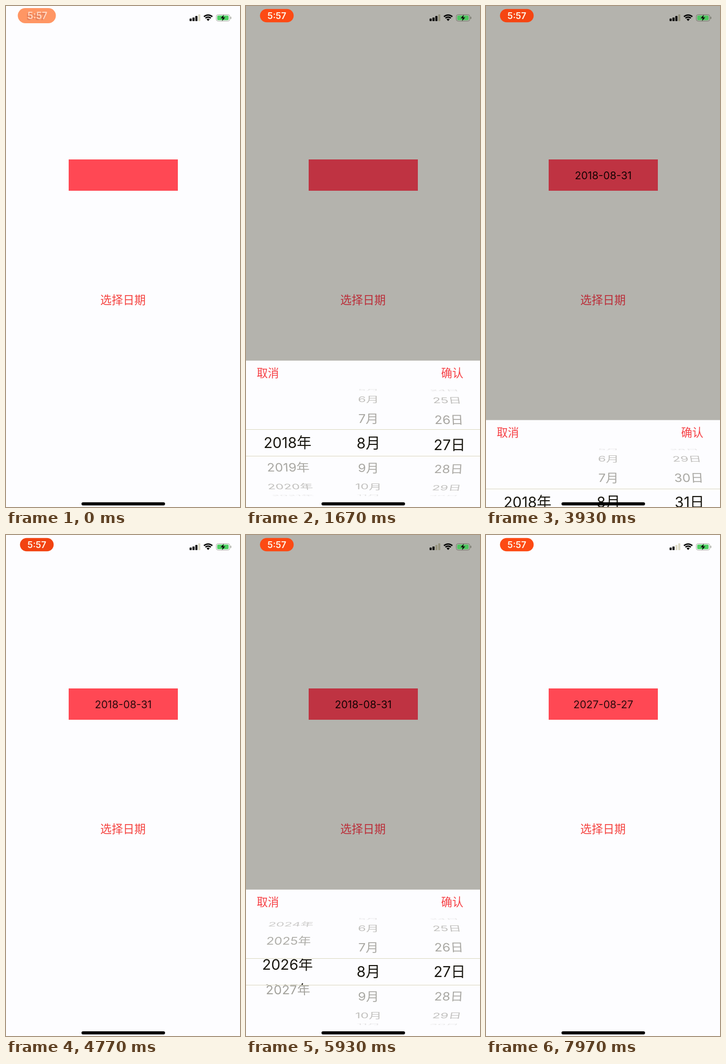
Recreate the animation shown at these times as an HTML page with a canvas. Size 448x960 px, loop 8 s.

```html
<!DOCTYPE html>
<html lang="zh-CN">
<head>
<meta charset="utf-8">
<title>选择日期</title>
<style>
html, body { margin: 0; width: 100%; height: 100%; overflow: hidden; background: #fdfdff; }
canvas { display: block; width: 448px; height: 960px; }
</style>
</head>
<body>
<canvas id="stage"></canvas>
<script>
const W = 448, H = 960, LOOP = 8000;
const FONT = 'Inter, "Noto Sans CJK SC", "Noto Sans CJK", "Noto Sans CJK JP", sans-serif';
const CJK = '"Noto Sans CJK SC", "Noto Sans CJK", "Noto Sans CJK JP", sans-serif';
const canvas = document.getElementById('stage');
const ctx = canvas.getContext('2d');
const dpr = window.devicePixelRatio || 1;
canvas.width = W * dpr;
canvas.height = H * dpr;

const SHEET_TOP = 679.5, SHEET_H = 281;
const MID = 837, BAND_TOP = 811.5, BAND_BOTTOM = 862.5;
const RADIUS = 102, STEP = 27.5 * Math.PI / 180, AXIS = 234.5;

const progress = (t, from, to) => Math.min(1, Math.max(0, (t - from) / (to - from)));
const smooth = u => u * u * (3 - 2 * u);
const easeOut = u => 1 - (1 - u) ** 3;
const mix = (a, b, u) => a + (b - a) * u;
const mixRgb = (a, b, u) => `rgb(${a.map((v, i) => Math.round(mix(v, b[i], u)))})`;

// Each session: slide in, spin the wheels to today, slide out.
const sessions = [
  { open: 1000, close: 3800, spin: 1070 },
  { open: 4900, close: 7038, spin: 4970 }
];
const SLIDE = 300, SPIN = 700;

function wheelsAt(t, index) {
  const s = sessions[index];
  const spin = easeOut(progress(t, s.spin, s.spin + SPIN));
  const wheels = { year: 2018, month: mix(1, 8, spin), day: mix(1, 27, spin) };
  if (index === 0) {
    wheels.day += 4.6 * easeOut(progress(t, 2200, 2800));
    wheels.day -= 0.6 * easeOut(progress(t, 2800, 3320));
  } else {
    wheels.year += 9 * easeOut(progress(t, 5500, 6255));
  }
  return wheels;
}

function text(str, x, y, size, color, family = FONT, weight = 400, align = 'center') {
  ctx.font = `${weight} ${size}px ${family}`;
  ctx.textAlign = align;
  ctx.fillStyle = color;
  ctx.fillText(str, x, y);
}

function roundRect(x, y, w, h, r) {
  ctx.beginPath();
  ctx.roundRect(x, y, w, h, r);
}

function clipped(y, h, draw) {
  ctx.save();
  ctx.beginPath();
  ctx.rect(0, y, W, h);
  ctx.clip();
  draw();
  ctx.restore();
}

function drawColumn(col, pos, scale, inBand) {
  const first = Math.max(col.min, Math.ceil(pos - 3.2));
  const last = Math.min(col.max, Math.floor(pos + 3.2));
  for (let n = first; n <= last; n++) {
    const angle = (n - pos) * STEP;
    const cos = Math.cos(angle), sin = Math.sin(angle);
    if (cos <= 0.02) continue;
    const lean = (AXIS - col.x) * 0.00075;
    const x = col.x + lean * RADIUS * (1 - cos);
    ctx.save();
    ctx.transform(scale, 0, lean * sin * scale, scale * cos, x, MID + RADIUS * sin);
    const color = inBand ? '#191710' : `rgba(78,75,62,${0.08 + 0.45 * cos})`;
    text(n + col.unit, 0, 10.2, 28, color);
    ctx.restore();
  }
}

const columns = [
  { key: 'year', unit: '年', x: 79.5, min: 2018, max: 2027 },
  { key: 'month', unit: '月', x: 234.5, min: 1, max: 12 },
  { key: 'day', unit: '日', x: 389.7, min: 1, max: 31 }
];

function drawSheet(offset, wheels) {
  ctx.save();
  ctx.translate(0, offset);
  ctx.fillStyle = '#fdfdff';
  ctx.fillRect(0, SHEET_TOP, W, SHEET_H);
  text('取消', 20.5, 711, 21.3, '#f64045', CJK, 400, 'left');
  text('确认', 416, 711, 21.3, '#f64045', CJK, 400, 'right');
  const rows = (scale, inBand) => () =>
    columns.forEach(c => drawColumn(c, wheels[c.key], scale, inBand));
  clipped(728, BAND_TOP - 728, rows(0.89, false));
  clipped(BAND_TOP, BAND_BOTTOM - BAND_TOP, rows(1, true));
  clipped(BAND_BOTTOM, 100, rows(0.89, false));
  ctx.fillStyle = '#dbd8c0';
  ctx.fillRect(0, 811, W, 1);
  ctx.fillRect(0, 862, W, 1);
  ctx.restore();
}

function drawClock(t) {
  const settle = smooth(progress(t, 30, 450));
  const dip = Math.max(0, 1 - Math.abs(t - 4500) / 1500);
  const grow = mix(1.13, 1, settle);
  const w = 64.5 * grow, h = 25.5 * grow;
  const rest = [mix(253, 240, dip), mix(74, 66, dip), mix(20, 16, dip)];
  ctx.fillStyle = mixRgb([255, 150, 100], rest, settle);
  roundRect(59 - w / 2, 18.5 - h / 2, w, h, h / 2);
  ctx.fill();
  if (settle < 1) {
    ctx.globalAlpha = 1 - settle;
    text('5:57', 57.5, 27, 17.5, '#e07c5c', FONT, 600);
    ctx.globalAlpha = 1;
  }
  text('5:57', mix(60, 59, settle), 24.7, 17 * mix(1.06, 1, settle),
    mixRgb([255, 215, 195], [255, 248, 235], settle), FONT, 600);
}

function drawStatusIcons(t, dim) {
  const strength = t < 5400 ? 3 : 2;
  [5, 7, 10, 13].forEach((h, i) => {
    ctx.fillStyle = i < strength ? '#000' : dim ? '#96937d' : '#dedbc6';
    roundRect(351.5 + i * 5.5, 29 - h, 4, h, 1);
    ctx.fill();
  });

  // Wi-Fi fan
  const cx = 387, cy = 28.5, a = Math.PI * 0.25;
  ctx.strokeStyle = ctx.fillStyle = '#000';
  ctx.lineWidth = 2.6;
  for (const r of [11.3, 7.2]) {
    ctx.beginPath();
    ctx.arc(cx, cy, r, -Math.PI / 2 - a, -Math.PI / 2 + a);
    ctx.stroke();
  }
  ctx.beginPath();
  ctx.moveTo(cx, cy + 0.3);
  ctx.arc(cx, cy, 4.2, -Math.PI / 2 - a, -Math.PI / 2 + a);
  ctx.fill();

  // Battery
  ctx.lineWidth = 1;
  ctx.strokeStyle = dim ? '#77766c' : '#a9a9a2';
  roundRect(402.5, 16.5, 26, 12.5, 3.8);
  ctx.stroke();
  ctx.fillStyle = ctx.strokeStyle;
  roundRect(429.7, 20.5, 1.6, 4.5, 0.8);
  ctx.fill();
  ctx.fillStyle = dim ? '#4ec55f' : '#4fcf63';
  roundRect(404.3, 18.3, 22, 9, 2.2);
  ctx.fill();
  ctx.beginPath();
  [[417, 16.8], [410.8, 23.6], [414.8, 23.6], [413.6, 28.9], [419.8, 21.8], [415.8, 21.8]]
    .forEach(([x, y]) => ctx.lineTo(x, y));
  ctx.closePath();
  ctx.fillStyle = '#0a0f08';
  ctx.fill();
}

function render(t) {
  ctx.setTransform(dpr, 0, 0, dpr, 0, 0);
  const index = sessions.findIndex(s => t >= s.open && t < s.close + SLIDE);
  const dim = index >= 0;

  ctx.fillStyle = dim ? '#b4b3ad' : '#fdfdff';
  ctx.fillRect(0, 0, W, H);
  ctx.fillStyle = dim ? '#bf3342' : '#ff4854';
  ctx.fillRect(120, 294, 209, 60);
  const date = t >= sessions[1].close ? '2027-08-27' : t >= sessions[0].close ? '2018-08-31' : '';
  text(date, 224.5, 332, 20, dim ? '#140303' : '#2a0a0c');
  text('选择日期', 224, 571, 21.7, dim ? '#bb2d38' : '#f5423f', CJK);

  drawStatusIcons(t, dim);
  drawClock(t);

  if (dim) {
    const s = sessions[index];
    const shown = smooth(progress(t, s.open, s.open + SLIDE));
    const hidden = smooth(progress(t, s.close, s.close + SLIDE));
    drawSheet(SHEET_H * (1 - shown + hidden), wheelsAt(t, index));
  }

  ctx.fillStyle = '#000';
  roundRect(144.5, 951, 160, 6, 3);
  ctx.fill();
}

const start = performance.now();
function tick() {
  render((performance.now() - start) % LOOP);
  requestAnimationFrame(tick);
}
tick();
</script>
</body>
</html>
```
